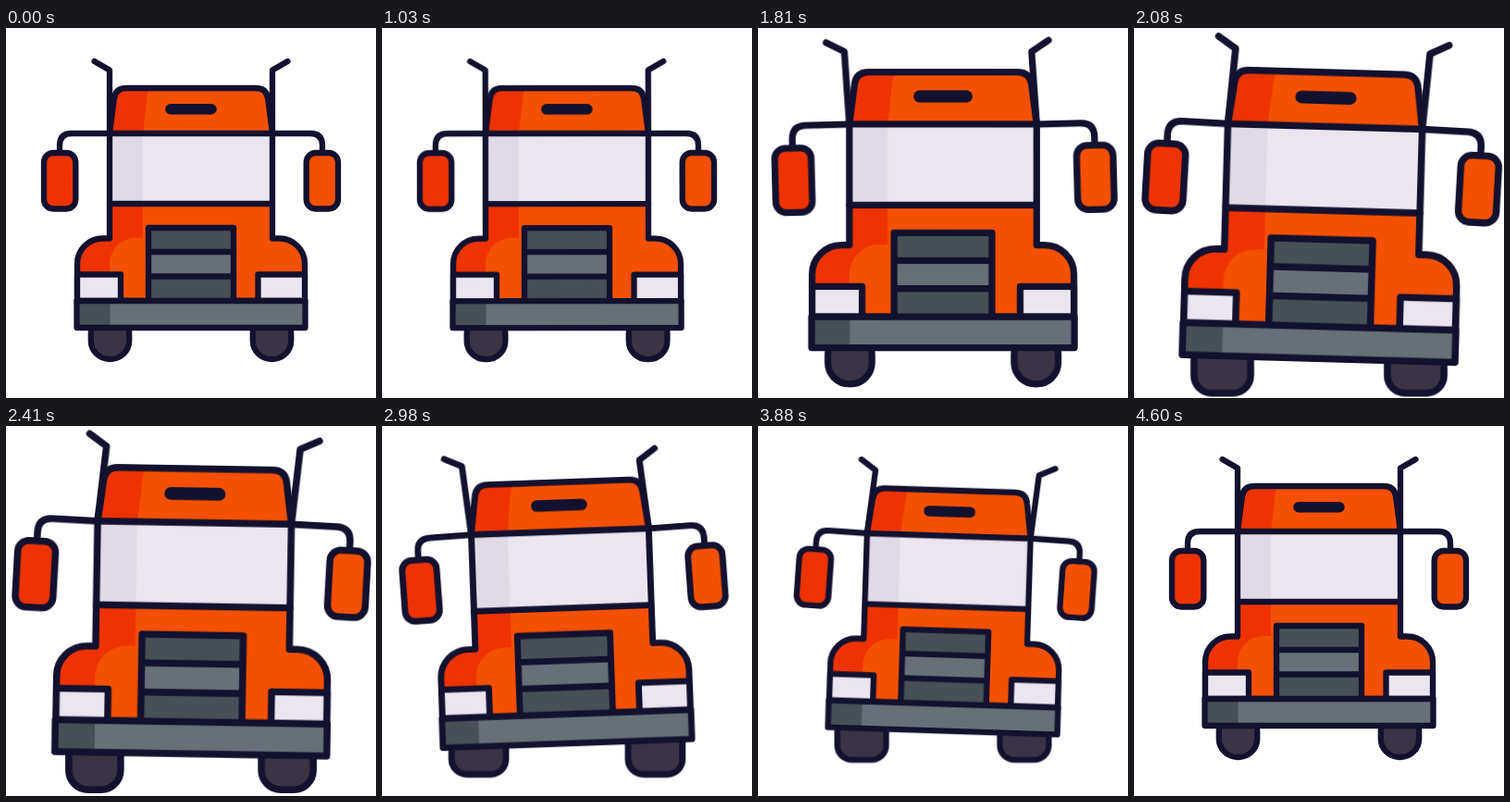
Animation, 400 px wide and 400 px high, one loop 4630 ms. Source, as an HTML page:

```html
<!DOCTYPE html>
<html lang="en">
<head>
<meta charset="utf-8">
<title>Truck</title>
<style>
  html, body { margin: 0; width: 100%; height: 100%; overflow: hidden; background: #fff; }
  svg { display: block; width: 100vw; height: 100vh; }

  .truck, .body, .pipe, .mirror, .wheel {
    animation: 4630ms cubic-bezier(.3333, 0, .6667, 1) infinite;
  }
  .truck { animation-name: zoom; transform-origin: 200px 180px; }
  .body { animation-name: rock; transform-origin: 200px 310px; }
  .wheel { animation-name: squash; }
  .pipe, .mirror { animation-name: sway; }
  .pipe { --swing: 5.8deg; }
  .mirror { --swing: 2.2deg; }
  .left { transform-origin: 112px 114px; }
  .right { transform-origin: 288px 114px; }

  .line { stroke: #12112f; stroke-width: 6.3; stroke-linecap: round; stroke-linejoin: round; }
  .none { fill: none; }
  .orange { fill: #f55000; }
  .red { fill: #ee3300; }
  .glass { fill: #ebe5ef; }
  .dim { fill: #e0dae6; }
  .steel { fill: #676f79; }
  .iron { fill: #474f57; }
  .tyre { fill: #3b3346; }

  @keyframes zoom {
    0%, 21.598% { transform: scale(1); }
    47.516% { transform: scale(1.2); animation-timing-function: cubic-bezier(.29, 0, .35, 1); }
    90.713%, 100% { transform: scale(1); }
  }
  @keyframes rock {
    0%, 21.598%, 38.877%, 56.156%, 73.434%, 90.713%, 100% { transform: translateY(0) rotate(0deg); }
    30.238%, 64.795% { transform: translateY(5.6px) rotate(-2.05deg); }
    47.516%, 82.073% { transform: translateY(5.6px) rotate(2.05deg); }
  }
  @keyframes squash {
    0%, 21.598%, 38.877%, 56.156%, 73.434%, 90.713%, 100% { x: -20.7px; width: 41.4px; height: 48px; rx: 20px; ry: 20px; }
    30.238%, 47.516%, 64.795%, 82.073% { x: -27px; width: 54px; height: 50.3px; rx: 15px; ry: 15px; }
  }
  /* Loose parts hold at each extreme before following the cab. */
  @keyframes sway {
    0%, 21.598%, 99.352%, 100% { transform: rotate(0deg); }
    30.238%, 36.285%, 64.795%, 70.842% { transform: rotate(calc(var(--swing) * -1)); }
    47.516%, 53.564%, 82.073%, 88.121% { transform: rotate(var(--swing)); }
  }
</style>
</head>
<body>
<svg viewBox="0 0 400 400">
  <g class="truck">
    <g transform="translate(112.5 0)">
      <rect class="wheel line tyre" x="-20.7" y="310" width="41.4" height="48" rx="20"/>
    </g>
    <g transform="translate(287.5 0)">
      <rect class="wheel line tyre" x="-20.7" y="310" width="41.4" height="48" rx="20"/>
    </g>

    <g class="body">
      <path class="pipe left line none" d="M95.5 36L112 45.5V114"/>
      <path class="pipe right line none" d="M304.5 36L288 45.5V114"/>

      <g class="mirror left line">
        <path class="none" d="M112 114H71Q58 114 58 127V135"/>
        <rect class="red" x="41" y="135" width="34.3" height="60.5" rx="10"/>
      </g>
      <g class="mirror right line">
        <path class="none" d="M288 114H329Q342 114 342 127V135"/>
        <rect class="orange" x="324.7" y="135" width="34.3" height="60.5" rx="10"/>
      </g>

      <path id="shell" class="orange" d="M77 295V255A27.5 27.5 0 0 1 104.5 227.500H112V114L116.800 77Q118 65 130 65H270Q282 65 283.200 77L288 114V227.500H295.500A27.500 27.500 0 0 1 323 255V295Z"/>
      <path class="red" d="M112 114L116.800 77Q118 65 130 65H157Q153.500 66 152.500 73L148 114ZM112 190H148V227H140A28 28 0 0 0 112 255V295H77V255A27.500 27.500 0 0 1 104.500 227.500H112Z"/>
      <rect class="glass" x="112" y="114" width="176" height="76"/>
      <rect class="dim" x="112" y="114" width="36" height="76"/>
      <use href="#shell" class="line" style="fill-opacity:0"/>
      <path class="line none" d="M112 114H288M112 190H288"/>
      <path class="line none" style="stroke-width:11.500" d="M178 87.800H222"/>

      <rect class="iron" x="154" y="216" width="92" height="79"/>
      <rect class="steel" x="154" y="242" width="92" height="26.500"/>
      <path class="line none" d="M154 295V216H246V295M154 242H246M154 268.500H246"/>

      <path class="line glass" d="M77 266.500H124V295H77ZM272.500 266.500H323V295H272.500Z"/>
      <rect class="steel" x="76.500" y="295" width="247" height="29"/>
      <rect class="iron" x="76.500" y="295" width="36" height="29"/>
      <rect class="line none" x="76.500" y="295" width="247" height="29"/>
    </g>
  </g>
</svg>
<script>
  // The reused outline must not repaint the fill over the shading.
  const shell = document.getElementById("shell");
  const edge = document.querySelector("use");
  const rim = shell.cloneNode();
  rim.removeAttribute("id");
  rim.setAttribute("class", "line none");
  edge.replaceWith(rim);
</script>
</body>
</html>
```
